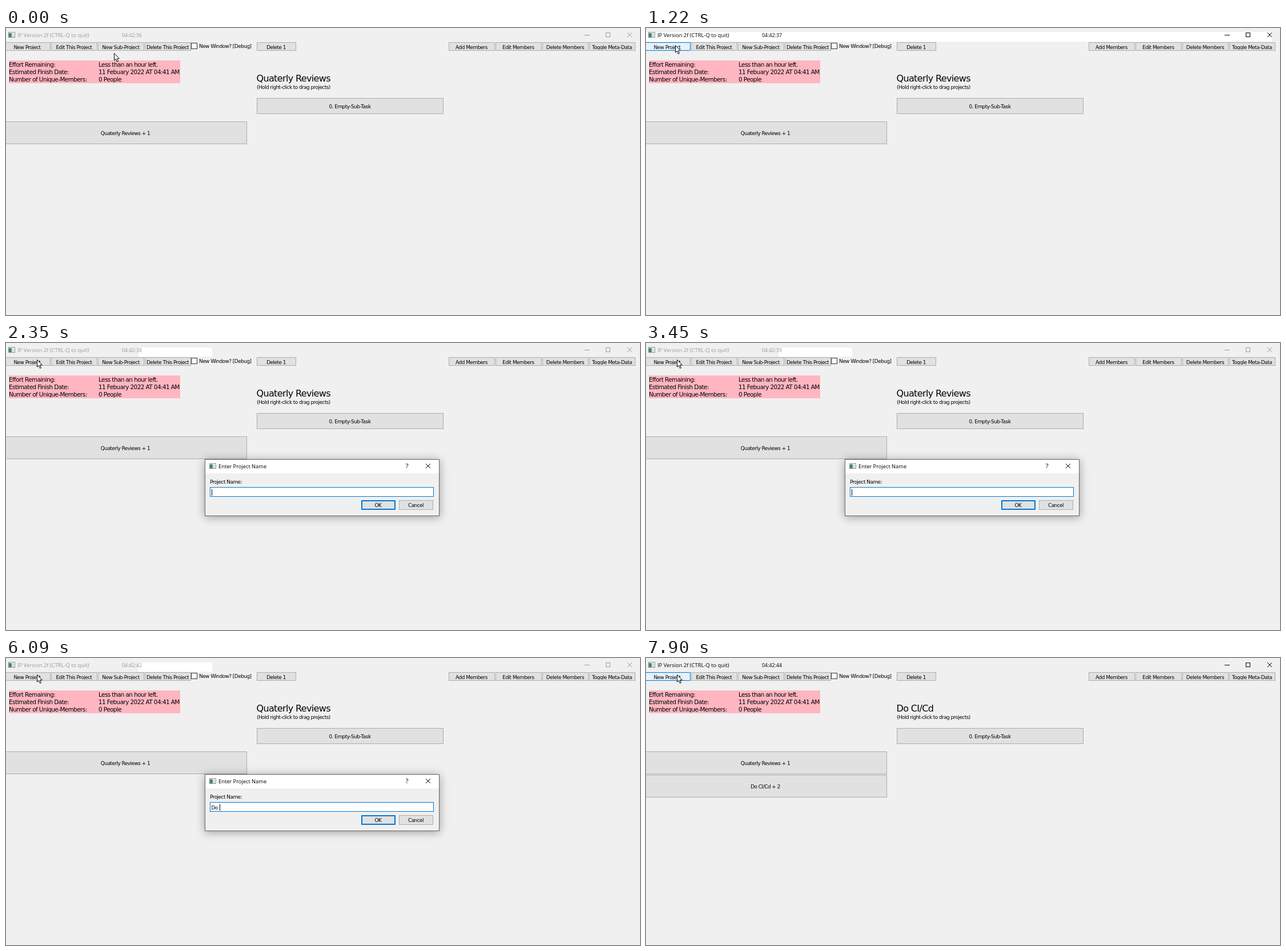
An HTML page with a canvas that plays this animation: 1110x504 px, repeating every 8000 ms.

```html
<!DOCTYPE html>
<html lang="en">
<head>
<meta charset="utf-8">
<title>Project planner</title>
<style>
  html, body { margin: 0; width: 100%; height: 100%; overflow: hidden; background: #f0f0f0; }
  canvas { display: block; width: 1110px; height: 504px; }
</style>
</head>
<body>
<canvas id="stage" width="1110" height="504"></canvas>
<script>
const ctx = document.getElementById('stage').getContext('2d');
const LOOP = 8000;
const BLUE = '#0078d7';
const UI = '"DejaVu Sans", sans-serif';
const TITLE = '"Open Sans", "Noto Sans", sans-serif';

// Each timeline is a list of [start time, value]; the value holds until the next entry.
const cursorPath = [
  [0, [189, 44]], [160, [184, 39]], [280, [177, 41]], [430, [150, 36]], [550, [118, 29]],
  [670, [90, 24]], [810, [56, 24]], [950, [52, 27]], [1090, [51, 29]], [1220, [51, 30]], [1370, [54, 29]]
];
const hovers = [
  [0, -1], [160, 2], [430, 1], [810, 0], [1490, -1], [7200, 0]
];
const typed = [
  [0, ''], [4810, 'D'], [5520, 'Do'], [6090, 'Do '], [6220, 'Do C'], [6350, 'Do CI'],
  [6640, 'Do CI/'], [6770, 'Do CI/C'], [6960, 'Do CI/Cd']
];
const caret = [
  [0, false], [2350, true], [2910, false], [3450, true], [3970, false],
  [4420, true], [5220, false], [5520, true]
];
// Dialog state: [opacity, scale]
const dialogStates = [
  [0, [0, 1]], [1370, [0.3, 0.966]], [1490, [0.85, 0.99]], [1610, [1, 1]],
  [7080, [0.25, 0.966]], [7200, [0, 1]]
];
const ticks = [950, 1850, 2910, 3840, 4680, 5810, 6960, 7900];

const at = (timeline, t) => timeline.filter(([start]) => start <= t).pop()[1];

function rect(x, y, w, h, fill, stroke, width = 1) {
  ctx.fillStyle = fill;
  ctx.fillRect(x, y, w, h);
  if (!stroke) return;
  ctx.strokeStyle = stroke;
  ctx.lineWidth = width;
  ctx.strokeRect(x + width / 2, y + width / 2, w - width, h - width);
}

function text(str, x, y, { size = 8.85, font = UI, color = '#000', align = 'left', tracking = -0.053 } = {}) {
  ctx.font = `${size}px ${font}`;
  ctx.letterSpacing = font === UI ? `${tracking * size}px` : '0px';
  ctx.textAlign = align;
  ctx.fillStyle = color;
  ctx.fillText(str, x, y);
}

function lines(color, ...paths) {
  ctx.strokeStyle = color;
  ctx.lineWidth = 1;
  ctx.beginPath();
  for (const [x1, y1, x2, y2] of paths) {
    ctx.moveTo(x1, y1);
    ctx.lineTo(x2, y2);
  }
  ctx.stroke();
}

function button(label, x, y, w, h, { hot = false, border = 1, drop = 4 } = {}) {
  const outline = hot || border > 1 ? BLUE : '#adadad';
  rect(x, y, w, h, hot ? '#e5f1fb' : '#e1e1e1', outline, border);
  ctx.save();
  ctx.beginPath();
  ctx.rect(x, y, w, h - 2);
  ctx.clip();
  text(label, x + w / 2 - 0.5, y + h / 2 + drop, { align: 'center' });
  ctx.restore();
}

const toolButton = (label, x, w = 81, hot = false) =>
  button(label, x, 25, w, 15, { hot, drop: 4.5 });

function cross(x, y, color) {
  lines(color, [x - 4, y - 4, x + 4, y + 4], [x + 4, y - 4, x - 4, y + 4]);
}

function appIcon(x, y) {
  rect(x, y, 12, 10, '#fafafa', '#8c9196');
  rect(x + 1, y + 2, 5, 7, '#3f8878');
  rect(x + 7, y + 2, 3, 7, '#d4dadd');
}

function titleBar(t) {
  const opening = t >= 1090 && t < 1490;
  const color = opening || t >= 7080 ? '#000' : '#999';
  if (opening) rect(0, 7, 1096, 17, '#fff');
  else if (t >= 1490 && t < 7080) rect(232, 8, 129, 16, '#fff');
  appIcon(4, 7);
  text('IP Version 2f (CTRL-Q to quit)', 20, 15.5, { size: 9.4, font: TITLE, color });
  const seconds = 36 + ticks.filter(tick => tick <= t).length;
  text(`04:42:${seconds}`, 203, 15.5, { size: 8.9, font: TITLE, color });
  lines(color, [1013, 12.5, 1022, 12.5]);
  ctx.strokeRect(1050.5, 8.5, 7, 7);
  cross(1092, 12, color);
}

function toolbar(hover) {
  ['New Project', 'Edit This Project', 'New Sub-Project', 'Delete This Project'].forEach((label, i) =>
    toolButton(label, 82 * i - 3, 81, hover === i));
  rect(324, 26, 11, 11, '#fff', '#333');
  text('New Window? [Debug]', 338, 35);
  toolButton('Delete 1', 439, 69);
  ['Add Members', 'Edit Members', 'Delete Members', 'Toggle Meta-Data'].forEach((label, i) =>
    toolButton(label, 775 + 82 * i));
}

function content(added) {
  rect(5, 57, 300, 40, '#ffb6c1');
  [
    ['Effort Remaining:', 'Less than an hour left.'],
    ['Estimated Finish Date:', '11 Febuary 2022 AT 04:41 AM'],
    ['Number of Unique-Members:', '0 People']
  ].forEach(([label, value], i) => {
    text(label, 5, 68 + 13 * i, { size: 10.4 });
    text(value, 162, 68 + 13 * i, { size: 10.4 });
  });

  text(added ? 'Do CI/Cd' : 'Quaterly Reviews', 438.5, 94, { size: 16, tracking: -0.04 });
  text('(Hold right-click to drag projects)', 439, 107, { size: 8.75 });
  button('0. Empty-Sub-Task', 439, 123, 327, 28);
  button('Quaterly Reviews + 1', -3, 164, 425, 40);
  if (added) button('Do CI/Cd + 2', -3, 205, 425, 40);
}

// Soft shadow at full opacity; a flat rounded ring while the dialog fades.
function dialogShadow(fading) {
  ctx.save();
  if (fading) {
    ctx.fillStyle = 'rgba(0, 0, 0, 0.06)';
    ctx.beginPath();
    ctx.roundRect(342, 194, 424, 123, 13);
    ctx.rect(355, 206, 397, 96);
    ctx.fill('evenodd');
  } else {
    ctx.shadowColor = 'rgba(0, 0, 0, 0.36)';
    ctx.shadowBlur = 15;
    ctx.shadowOffsetY = 2;
    rect(348, 204, 411, 100, '#f0f0f0');
  }
  ctx.restore();
}

function dialog(t) {
  const [opacity, scale] = at(dialogStates, t);
  if (!opacity) return;
  const fading = opacity < 0.5;
  ctx.save();
  if (fading) dialogShadow(true);
  ctx.globalAlpha = opacity;
  ctx.translate(553, 254);
  ctx.scale(scale, scale);
  ctx.translate(-553, -254);
  if (!fading) dialogShadow(false);

  rect(348, 204, 411, 100, '#f0f0f0', '#646464');
  if (!fading) rect(349, 205, 409, 24, '#fff');

  appIcon(356, 211);
  text('Enter Project Name', 372, 220, { size: 9.3, font: TITLE });
  if (!fading) {
    text('?', 702, 220, { size: 11, font: TITLE, align: 'center' });
    cross(739, 216, '#000');
  }

  text('Project Name:', 357, 247);
  rect(357, 253, 392, 17, fading ? '#f0f0f0' : '#fff', BLUE);
  const value = at(typed, t);
  text(value, 359.5, 266);
  if (at(caret, t)) rect(360 + Math.round(ctx.measureText(value).width), 257, 1, 11, '#000');

  button('OK', 622, 276, 60, 17, { border: 2, drop: 3.5 });
  button('Cancel', 688, 276, 60, 17, { drop: 3.5 });
  ctx.restore();
}

function cursor(x, y) {
  ctx.save();
  ctx.translate(x + 0.5, y + 0.5);
  ctx.beginPath();
  ctx.moveTo(0, 0);
  for (const [px, py] of [[0, 12.5], [2.8, 10], [5, 15], [7, 14], [4.8, 9.4], [8.8, 9.2]]) ctx.lineTo(px, py);
  ctx.closePath();
  ctx.fillStyle = '#fff';
  ctx.fill();
  ctx.strokeStyle = '#000';
  ctx.lineWidth = 1;
  ctx.stroke();
  ctx.restore();
}

function draw(now) {
  const t = now % LOOP;
  rect(0, 0, 1110, 504, '#f0f0f0');
  titleBar(t);
  toolbar(at(hovers, t));
  content(t >= 7080);
  dialog(t);
  cursor(...at(cursorPath, t));
}

const start = performance.now();
function frame() {
  draw(performance.now() - start);
  requestAnimationFrame(frame);
}
frame();
</script>
</body>
</html>
```
